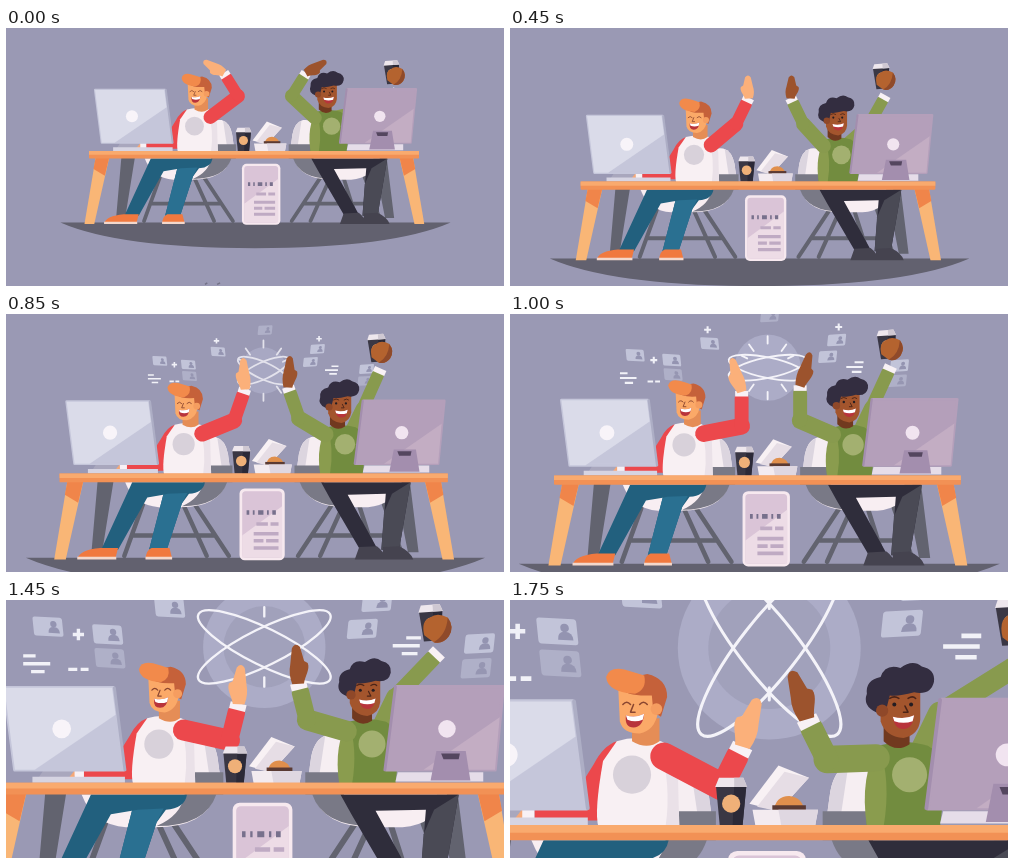
Write an HTML page that moves like this. It is 498 by 258 pixels and loops after 1.8 s.

```html
<!DOCTYPE html>
<html lang="en">
<head>
<meta charset="utf-8">
<title>High five at the desk</title>
<style>
  html, body { margin: 0; width: 100%; height: 100%; overflow: hidden; background: #9a99b4; }
  svg { display: block; width: 498px; height: 258px; }
  .line { fill: none; stroke-linecap: round; stroke-linejoin: round; }
  .red { stroke: #ec484c; }
  .green { stroke: #889a4e; }
  .cuff { stroke: #f8f1f5; stroke-linecap: butt; }
  .sticks { stroke: #62636f; stroke-width: 5; }
</style>
</head>
<body>
<svg viewBox="0 0 498 258">
  <defs>
    <path id="palm" d="M-5 1C-6 -6 -11 -12 -9 -18L-6 -20L-3 -33Q1 -38 4 -32L6 -17Q8 -9 5 1Z"/>
    <g id="card">
      <rect x="-13" y="-8.500" width="26" height="17" rx="2" fill="#d0d3e6"/>
      <circle cx="5" cy="-2.500" r="2.800" fill="#9293b1"/>
      <path d="M0 5.500Q0 0 5 0T10 5.500Z" fill="#9293b1"/>
    </g>
    <path id="plus" d="M-5 0H5M0 -5V5" stroke="#f0f0f7" stroke-width="3"/>
    <g id="cup">
      <path d="M-10 -9H10L7.500 17H-7.500Z" fill="#3a3744"/>
      <path d="M2 -9H10L7.500 17H1Z" fill="#2b2937"/>
      <path d="M-8 -14H8L10.500 -8H-10.500Z" fill="#eee7ed"/>
      <path d="M2 -14H8L10.500 -8H2Z" fill="#cfc8d2"/>
      <circle cy="3" r="6" fill="#efb078"/>
    </g>
    <g id="chair">
      <path d="M184 166V136Q190 123 204 125Q215 128 218 144L221 166Z" fill="#f6eef2"/>
      <path d="M206 126Q215 129 218 144L221 166H212Z" fill="#dcd5df"/>
      <path class="line sticks" d="M122 201L101 259M180 200L219 259M168 202L194 259M150 202L132 259M112 236H202"/>
      <path d="M102 176H216Q208 204 165 204H140Q112 202 102 176Z" fill="#f8eef2"/>
      <path d="M192 157H223V176H217Q208 203 166 203Q187 194 190 176Z" fill="#797986"/>
    </g>
    <g id="leg">
      <path d="M37 174H55L35 263H22Z" fill="#f9b676"/>
      <path d="M37 174H55L49 199L34 190Z" fill="#f0854a"/>
    </g>
  </defs>

  <rect width="498" height="258" fill="#9a99b4"/>
  <g id="scene">
    <g id="atom">
      <circle id="halo" fill="#c4c6e0" opacity=".42"/>
      <circle id="core" fill="#9a99b4"/>
      <g class="line" stroke="#f4f3f9" stroke-width="2">
        <ellipse id="orbitA"/><ellipse id="orbitB"/>
        <path d="M0 -34V-26M0 26V34"/>
        <path id="rays" d="M-20 -25L-15 -18M20 -25L15 -18M-28 -13L-22 -10M28 -13L22 -10M-20 25L-15 18M20 25L15 18"/>
      </g>
    </g>
    <g id="icons">
      <g id="cards"></g>
      <path d="M-214 8H-203M-214 15H-190M-207 22H-195M-174 20H-166M-163 20H-156
               M126 -8H139M114 -1H138M122 6H136" stroke="#f2f2f8" stroke-width="3"/>
    </g>

    <path d="M-10 261H508Q430 295 248 295Q68 295 -10 261Z" fill="#62616f"/>
    <path d="M182 343l3 -2M198 343l4 -2" stroke="#737287" stroke-width="2"/>
    <path d="M71 174H89L76 255H64ZM405 174H423L433 255H421Z" fill="#62636f"/>

    <use href="#chair"/>
    <use href="#chair" transform="matrix(-1 0 0 1 516 0)"/>

    <!-- trousers and shoes -->
    <path d="M110 176H192Q190 188 174 189L166 200L149 252H129L145 190L127 193L94 252H75Z" fill="#22607e"/>
    <path d="M150 189L145 190L129 252H149L166 200L172 188Z" fill="#2a7091"/>
    <path d="M48 262Q51 252 74 250H94L91 262ZM125 262Q126 252 132 250H152L155 262Z" fill="#f0793f"/>
    <path d="M48 260H92V263H48ZM125 260H155V263H125Z" fill="#f3d8cc"/>
    <path d="M323 176H424L411 252H391L396 189L353 190L386 250L367 252L333 194Z" fill="#2f2d3b"/>
    <path d="M403 189L424 176L411 252H391L394 210Z" fill="#4a4a55"/>
    <path d="M361 263L366 249L386 248Q394 254 396 263ZM392 263L393 249L411 248Q424 254 427 263Z" fill="#45434f"/>

    <!-- left person -->
    <path d="M158 111Q149 114 143 126L128 150L104 155V163H152Z" fill="#ec484c"/>
    <path d="M95 155L104 154V163H96Z" fill="#f8f1f5"/>
    <path d="M96 156Q86 156 84 161L96 163Z" fill="#f6a877"/>
    <path d="M158 111Q171 107 187 111Q197 115 198 130L199 167H146Q143 158 149 124Z" fill="#f8f0f3"/>
    <path d="M186 111Q197 115 198 130L199 167H190Q194 140 186 111Z" fill="#eae1e8"/>
    <circle cx="168" cy="133" r="12.500" fill="#d8d1da"/>
    <g id="headL">
      <path d="M168 96H186V111Q178 117 168 111Z" fill="#e58d56"/>
      <path d="M159 77H185V92Q183 104 173 106Q162 106 160 98Z" fill="#fba968"/>
      <path d="M164 66Q170 69 178 67Q191 70 191 82L187 95L182 92L181 81Q165 82 160 76Z" fill="#c5613a"/>
      <path d="M151 69Q153 62 163 64Q170 66 176 68Q178 77 170 80Q152 79 151 69Z" fill="#f28a4b"/>
      <circle cx="184" cy="90" r="3.800" fill="#f59d60"/>
      <path class="line" d="M162 87Q164.500 84 167 87M173 87Q175.500 84 178 87M169 87L167 92H170" stroke="#8a4630"/>
      <path d="M164 94Q170 96 176 93Q175 102 169 102T164 94Z" fill="#b8343b"/>
      <path d="M164 94Q170 96 176 93L175 97Q170 99 165 97Z" fill="#fff"/>
    </g>
    <path id="upperL" class="line red" stroke-width="18"/>
    <path id="foreL" class="line red" stroke-width="15"/>
    <path id="cuffL" class="line cuff" stroke-width="14"/>
    <use id="handL" href="#palm" fill="#fbb07a"/>

    <!-- right person -->
    <path id="upperC" class="line green" stroke-width="16"/>
    <path id="foreC" class="line green" stroke-width="14"/>
    <path id="cuffC" class="line cuff" stroke-width="14"/>
    <g id="cupC">
      <use href="#cup" transform="rotate(-4)"/>
      <path d="M-6 12Q-9 0 -1 -3Q5 -8 14 -3Q20 5 15 13Q10 20 2 18Z" fill="#b4632f"/>
      <path d="M14 -3Q20 5 15 13Q10 20 2 18Q13 12 14 -3Z" fill="#8f4a2a"/>
    </g>
    <path d="M330 114Q346 109 362 114Q374 121 373 140L370 167H322Q319 133 330 114Z" fill="#728c3f"/>
    <path d="M330 114Q338 137 333 167H322Q317 133 330 114Z" fill="#8a9c4e"/>
    <circle cx="350" cy="133" r="11.500" fill="#a3b070"/>
    <path id="upperR" class="line green" stroke-width="18"/>
    <path id="foreR" class="line green" stroke-width="15"/>
    <path id="cuffR" class="line cuff" stroke-width="14"/>
    <use id="handR" href="#palm" fill="#9c532d"/>
    <path d="M333 98H350V113Q341 119 333 111Z" fill="#71391f"/>
    <path d="M331 76H357V97Q356 107 346 109Q334 108 331 98Z" fill="#a3552d"/>
    <path d="M328 92Q319 88 322 80Q321 71 331 69Q334 60 344 63Q352 57 358 62Q367 64 366 72Q364 81 353 79Q342 82 337 81L334 93Z" fill="#332d40"/>
    <circle cx="332" cy="91" r="4" fill="#8f4829"/>
    <circle cx="340" cy="87" r="1.300" fill="#241d22"/>
    <circle cx="351" cy="87" r="1.300" fill="#241d22"/>
    <path class="line" d="M337 83Q340 81 343 83M349 83Q352 81 354 83M347 88L349 92H346" stroke="#4b2418"/>
    <path d="M339 95Q347 97 353 94Q352 103 346 103T339 95Z" fill="#b8343b"/>
    <path d="M339 95Q347 97 353 94L352 98Q346 100 340 98Z" fill="#fff"/>

    <!-- monitors -->
    <path d="M71 153H98L91 162H65Z" fill="#a9a7bd"/>
    <path d="M60 161H139V166H60Z" fill="#d6d4e2"/>
    <path class="line" d="M36 85H129L138 155H45Z" style="fill:#c5c6da" stroke="#c5c6da" stroke-width="3"/>
    <path d="M36 85H128L131 108L62 155H45Z" fill="#dadbe9"/>
    <path class="line" d="M130 85L139 155" stroke="#adaec5" stroke-width="2.500"/>
    <circle cx="85" cy="120" r="8" fill="#f8f4f9"/>
    <path d="M372 157H445V165H370Z" fill="#e6dde9"/>
    <path class="line" d="M371 84H462L455 155H362Z" style="fill:#b49fba" stroke="#b49fba" stroke-width="3"/>
    <path d="M459 110L455 155H394Z" fill="#c3adc3"/>
    <path class="line" d="M370 84L361 155" stroke="#a38eae" stroke-width="2.500"/>
    <path d="M405 139H430L434 164H400Z" fill="#a38eae"/>
    <path d="M409 141H425L424 146H411Z" fill="#54465f"/>
    <circle cx="414" cy="120" r="7.500" fill="#f1e4f0"/>

    <!-- desk -->
    <use href="#cup" transform="translate(233 149)"/>
    <path d="M245 152L264 127L284 135L264 157Z" fill="#f8f1f4"/>
    <path d="M250 154L268 131L284 135L264 157Z" fill="#e6dde5"/>
    <path d="M261 157Q262 147 271 147Q280 148 281 157Z" fill="#e08f4c"/>
    <path d="M260 153H282V157H260Z" fill="#5a3a33"/>
    <path d="M247 156H290L288 167H249Z" fill="#f3ebf0"/>
    <path d="M264 156H290L288 167H266Z" fill="#dfd7e1"/>
    <rect x="231" y="183" width="51" height="81" rx="6" fill="#f7e9ef"/>
    <rect x="234" y="186" width="45" height="75" rx="4" fill="#dac4d7"/>
    <path d="M279 203V261H234V236Z" fill="#eddce6"/>
    <path d="M239 210H242M246 210H248M252 210H258M262 210H264M268 210H272" stroke="#77708c" stroke-width="5"/>
    <path d="M250 223H263M266 223H275M247 234H275M247 242H258M261 242H275M247 250H275" stroke="#bfaac3" stroke-width="4"/>
    <use href="#leg"/>
    <use href="#leg" transform="matrix(-1 0 0 1 495 0)"/>
    <rect x="28" y="166" width="438" height="10" rx="1" fill="#f29155"/>
    <path d="M28 166H466V171H28Z" fill="#f9aa6e"/>

    <path id="flash" d="M260 28V64" stroke="#f4f4fb" stroke-width="4"/>
  </g>
</svg>

<script>
const LOOP = 1800, STEP = 50, END = 1750;
const CLAP = 600, REST = 1000;
const $ = id => document.getElementById(id);
const set = (id, attrs) => { for (const a in attrs) $(id).setAttribute(a, attrs[a]); };

const ramp = (t, from, to) => Math.min(1, Math.max(0, (t - from) / (to - from)));
const smooth = p => p * p * (3 - 2 * p);
const easeOut = p => 1 - (1 - p) ** 2;
const mix = (a, b, p) => a + (b - a) * p;

// Left arm joints: elbow, cuff, fingertip. The right arm mirrors them.
const WAVE = [[226, 93], [211, 69], [180, 47]];
const HIGH_FIVE = [[217, 96], [242, 70], [259, 30]];
const HOLD = [[230, 113], [230, 83], [219, 40]];
const LOWER = [[227, 141], [237, 121], [250, 83]];
const MIRROR = 523;

const blend = (a, b, p) => a.map((joint, i) => joint.map((v, k) => mix(v, b[i][k], p)));

function armPose(t) {
  if (t < CLAP) return blend(WAVE, HIGH_FIVE, smooth(ramp(t, 200, CLAP)));
  if (t < REST) return blend(HIGH_FIVE, HOLD, smooth(ramp(t, CLAP + 50, REST)));
  return blend(HOLD, LOWER, ramp(t, REST, END));
}

const seg = (a, b) => ({ d: `M${a}L${b}` });
const toward = (a, b, n) => {
  const d = Math.hypot(b[0] - a[0], b[1] - a[1]);
  return [a[0] + (b[0] - a[0]) * n / d, a[1] + (b[1] - a[1]) * n / d];
};

// Draws a sleeve and returns the wrist.
function sleeve(side, shoulder, elbow, cuff) {
  const wrist = toward(cuff, elbow, -8);
  set('upper' + side, seg(shoulder, elbow));
  set('fore' + side, seg(elbow, cuff));
  set('cuff' + side, seg(toward(cuff, elbow, -2), wrist));
  return wrist;
}

function raisedArm(side, shoulder, [elbow, cuff, tip], flip) {
  const wrist = sleeve(side, shoulder, elbow, cuff);
  const dx = tip[0] - wrist[0], dy = tip[1] - wrist[1];
  const turn = Math.atan2(dx, -dy) * 180 / Math.PI;
  set('hand' + side, {
    transform: `translate(${wrist}) rotate(${turn}) scale(${flip} ${Math.hypot(dx, dy) / 35})`
  });
}

function drawArms(t) {
  const pose = armPose(t);
  const lift = 18 * smooth(ramp(t, 650, 1550));
  raisedArm('L', [189, 121], pose, 1);
  raisedArm('R', [328, 122], pose.map(([x, y]) => [MIRROR - x, y - lift]), -1);

  const up = ramp(t, 0, 650), drift = ramp(t, 950, END);
  const x = mix(430, 386, up) + 31 * drift ** 1.6;
  const y = mix(60, 23, up) + 8 * drift;
  sleeve('C', [357, 120], [mix(412, 370, up), mix(108, 93, up)], [x + 1, y + 32]);
  set('cupC', { transform: `translate(${x} ${y})` });
}

function drawCamera(t) {
  const p = t / END;
  const x = 248 - 5.5 * p ** 4;
  const y = 123 + 35 * easeOut(ramp(t, 0, 700)) + 67 * p ** 5.3;
  const zoom = mix(.7534, 1.525, .37 * p ** 1.2 + .63 * p ** 5);
  set('scene', { transform: `translate(${x} ${y}) scale(${zoom}) translate(-247 -166)` });
}

function drawHologram(t) {
  const spread = easeOut(ramp(t, 550, END)) ** .6;
  set('icons', { transform: `translate(258 50) scale(${spread})`, opacity: t > 550 ? 1 : 0 });
  set('flash', { opacity: .8 * ramp(t, 550, 600) * (1 - ramp(t, 650, 760)) });

  const grown = ramp(t, 720, END), size = grown ** .4;
  const open = ramp(t, REST, 1450);
  set('atom', { transform: 'translate(258 50)', opacity: ramp(t, 720, 880) });
  set('halo', { r: 60 * size });
  set('core', { r: 40 * size, opacity: .6 * open });
  const orbit = { rx: 72 * size, ry: 8 + 11 * grown }, tilt = (t - 1140) * .085;
  set('orbitA', { ...orbit, transform: `rotate(${tilt})` });
  set('orbitB', { ...orbit, transform: `rotate(${-tilt})` });
  set('rays', { opacity: 1 - open });
}

// Cards lean away from the middle; every third one is fainter.
const card = ([x, y], i) => `<use href="#card" opacity="${i % 3 === 2 ? .4 : .75}"
  transform="translate(${x} ${y}) skewX(${x < 0 ? 6 : -6}) skewY(${x < 0 ? 3 : -3})"/>`;
const plus = ([x, y]) => `<use href="#plus" x="${x}" y="${y}"/>`;
$('cards').innerHTML =
  [[-192, -18], [-139, -11], [-137, 10], [-84, -35], [100, -40], [3, -75], [87, -16], [191, -3], [188, 19]]
    .map(card).join('') +
  [[-165, -11], [-87, -55], [103, -59]].map(plus).join('');

function draw(t) {
  drawCamera(t);
  drawArms(t);
  drawHologram(t);
  set('headL', { transform: `translate(${-2 * Math.sin(Math.PI * ramp(t, 300, REST))} 0)` });
}

const start = performance.now();
function tick() {
  const t = (performance.now() - start) % LOOP;
  draw(Math.floor(t / STEP) * STEP);
  requestAnimationFrame(tick);
}
tick();
</script>
</body>
</html>
```
